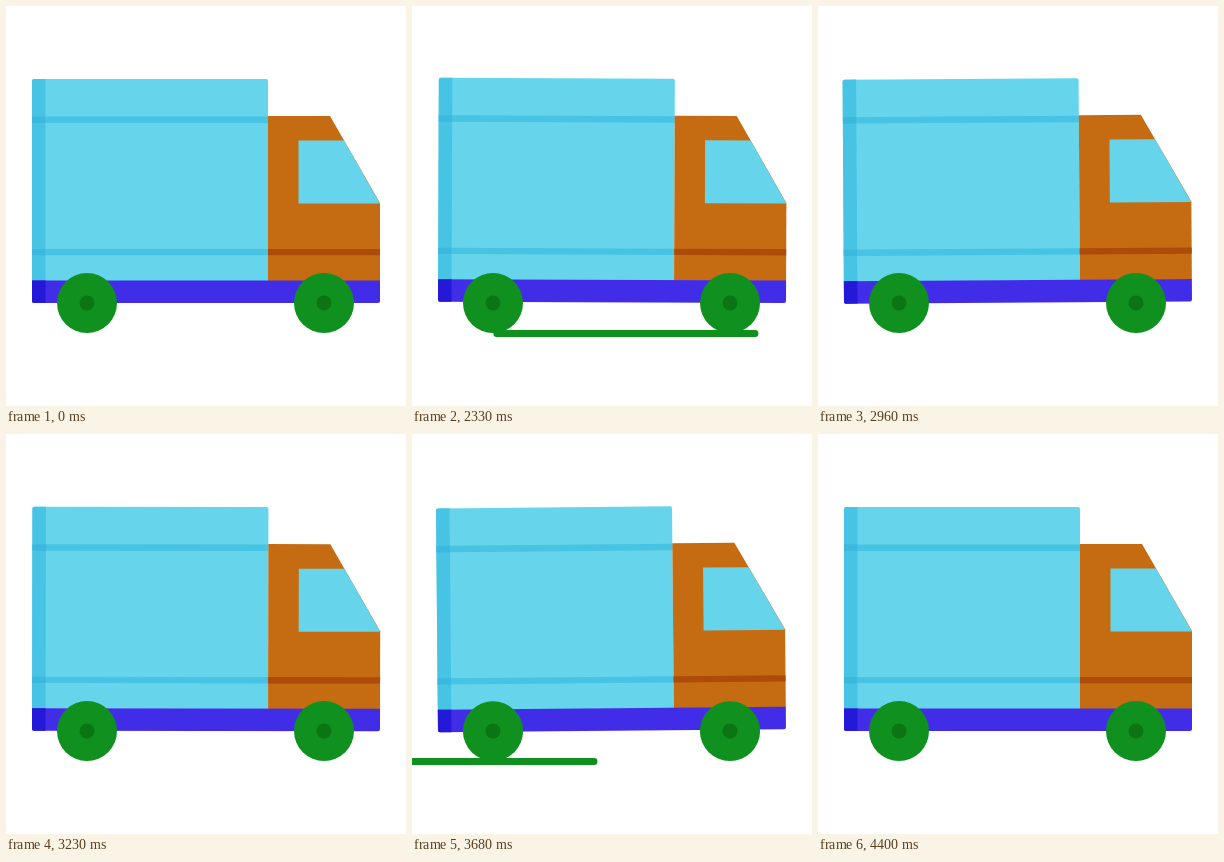
These frames come from a looping animation (400 by 400 pixels, 4430 ms). An HTML page:

```html
<!DOCTYPE html>
<html lang="en">
<head>
<meta charset="utf-8">
<title>Delivery truck</title>
<style>
  html, body { margin: 0; width: 100%; height: 100%; overflow: hidden; background: #fff; }
  svg { display: block; width: 100%; height: 100%; }
  .glass { fill: #66d5eb; }
  .shade { fill: #47c3e3; }
  .overlap { fill: #3bb8de; }
  .cab { fill: #c56c13; }
  .cab-band { fill: #ad4b0a; }
  .chassis { fill: #412de8; }
  .chassis-shade { fill: #2519d8; }
  .green { fill: #10911f; }
  .hub { fill: #0b7413; }
</style>
</head>
<body>
<svg viewBox="0 0 400 400">
  <defs>
    <g id="wheel">
      <circle class="green" r="30"/>
      <circle class="hub" r="7.5"/>
    </g>
  </defs>
  <g id="body">
    <path class="glass" d="M26 275V75q0-2 2-2H260q2 0 2 2V275z"/>
    <path class="shade" d="M26 275V75q0-2 2-2H39.5V275z"/>
    <path class="shade" d="M39.5 110.5H262v6.5H39.5zM39.5 243H262v6.3H39.5z"/>
    <path class="overlap" d="M26 110.5h13.5v6.5H26zM26 243h13.5v6.3H26z"/>
    <path class="cab" d="M262 110H324L374 197V275H262z"/>
    <path class="cab-band" d="M262 243H374v6.3H262z"/>
    <path class="glass" d="M292.5 134.5H338L374 197.5H292.5z"/>
    <path class="chassis" d="M26 274.5H374V295q0 2-2 2H28q-2 0-2-2z"/>
    <path class="chassis-shade" d="M26 274.5H39.5V297H28q-2 0-2-2z"/>
  </g>
  <rect id="road" class="green" x="435" y="324" width="265" height="7" rx="3.2"/>
  <use class="wheel" data-x="81" href="#wheel" transform="translate(81 297)"/>
  <use class="wheel" data-x="318" href="#wheel" transform="translate(318 297)"/>
</svg>
<script>
  const LOOP = 4430, REST = 2000, STEP = 30, CYCLE = 40;

  // [step, value] keys within one cycle
  const TILT = [[0, 0], [4, 0.76], [23, -1.05], [38, 0], [40, 0]];
  const BOB = [[0, 0], [10, -0.6], [24, 0.4], [32, -0.4], [40, 0]];
  const SQUASH = [[0, 0], [14, 0], [24, 0.03], [32, 0], [40, 0]];

  const body = document.getElementById('body');
  const road = document.getElementById('road');
  const wheels = document.querySelectorAll('.wheel');

  function ease(keys, k) {
    const i = keys.findIndex(key => key[0] > k);
    const [k0, v0] = keys[i - 1], [k1, v1] = keys[i];
    const p = (1 - Math.cos(Math.PI * (k - k0) / (k1 - k0))) / 2;
    return v0 + (v1 - v0) * p;
  }

  function draw(time) {
    const k = Math.max(0, Math.floor((time - REST) / STEP)) % CYCLE;
    const squash = ease(SQUASH, k);
    body.setAttribute('transform',
      `translate(200 ${297 + ease(BOB, k)}) rotate(${ease(TILT, k)}) ` +
      `scale(1 ${1 - 0.13 * squash}) translate(-200 -297)`);
    for (const wheel of wheels) {
      wheel.setAttribute('transform',
        `translate(${wheel.dataset.x} ${297 + 15 * squash}) scale(${1 + squash} ${1 - 1.4 * squash})`);
    }
    road.setAttribute('x', 435.6 - 32.2 * k);
  }

  const start = performance.now();
  function tick() {
    draw((performance.now() - start) % LOOP);
    requestAnimationFrame(tick);
  }
  tick();
</script>
</body>
</html>
```
